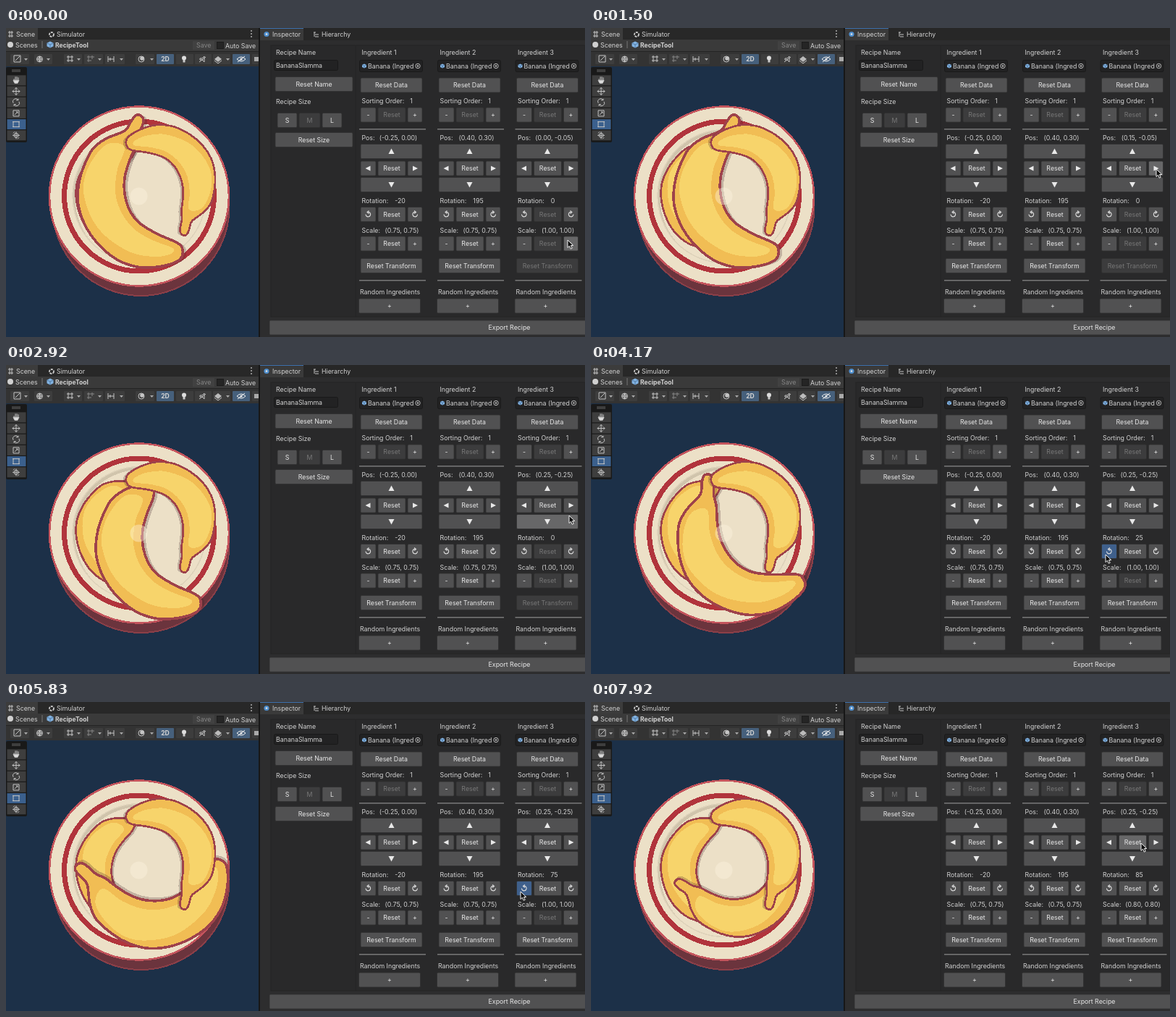
An HTML page for the animation above (8000 ms loop, 800 by 427 pixels).

```html
<!DOCTYPE html>
<html lang="en">
<head>
<meta charset="utf-8">
<title>Recipe tool</title>
<style>
  html, body { margin: 0; width: 100%; height: 100%; overflow: hidden; background: #191919; }
  svg { display: block; width: 800px; height: 427px; }
  text { font: 8.8px Inter, "Open Sans", sans-serif; fill: #d2d2d2; white-space: pre; }
  .mid { text-anchor: middle; }
  .bold { font-weight: 700; font-size: 8.6px; }
  .line { fill: none; stroke: #c4c4c4; stroke-width: 1; }
  .btn rect { fill: #515152; stroke: #303030; stroke-width: .8; }
  .btn text, .btn .solid { fill: #e8e8e8; }
  .btn .line { stroke: #e0e0e0; stroke-width: 1.1; }
  .btn.hover rect { fill: #676768; }
  .btn.press rect { fill: #3f608c; }
  .btn.off rect { fill: #3c3c3d; }
  .btn.off text { fill: #777; }
</style>
</head>
<body>
<svg id="stage" viewBox="0 0 800 427"></svg>
<script>
const stage = document.getElementById('stage');

function add(tag, attrs, parent = stage, content = '') {
  const node = document.createElementNS('http://www.w3.org/2000/svg', tag);
  for (const key in attrs) node.setAttribute(key, attrs[key]);
  node.textContent = content;
  parent.appendChild(node);
  return node;
}
const box = (x, y, w, h, fill, more, parent) => add('rect', { x, y, width: w, height: h, fill, ...more }, parent);
const label = (x, y, words, more, parent) => add('text', { x, y: y + 3.2, ...more }, parent, words);
const stroke = (d, more, parent) => add('path', { d, class: 'line', ...more }, parent);
const disc = (cx, cy, r, fill, more, parent) => add('circle', { cx, cy, r, fill, ...more }, parent);

// ---- scene -------------------------------------------------------------
box(0, 53, 349, 374, '#1c3048');
const scene = add('g', { 'shape-rendering': 'crispEdges' });

disc(186.5, 248, 122, '#6b343d', { stroke: '#8b3f48', 'stroke-width': 2 }, scene);
disc(184, 232.5, 124, '#ece0c7', { stroke: '#c4545c', 'stroke-width': 2.6 }, scene);
disc(184, 232.5, 103.5, 'none', { stroke: '#b1343c', 'stroke-width': 7 }, scene);
disc(184, 232.5, 92, '#d0c4ac', {}, scene);
disc(186.5, 235.5, 91, '#ece0c7', {}, scene);
disc(184, 232.5, 92, 'none', { stroke: '#ded2ba', 'stroke-width': 1.5 }, scene);

// Closed smooth curve through a flat list of x, y pairs.
function smooth(flat) {
  const n = flat.length / 2;
  const at = i => [flat[(i + n) % n * 2], flat[(i + n) % n * 2 + 1]];
  let d = `M${at(0)}`;
  for (let i = 0; i < n; i++) {
    const [a, b, c, e] = [at(i - 1), at(i), at(i + 1), at(i + 2)];
    const p = b.map((v, k) => v + (c[k] - a[k]) / 6);
    const q = c.map((v, k) => v - (e[k] - b[k]) / 6);
    d += `C${p} ${q} ${c}`;
  }
  return d + 'Z';
}
const skin = smooth([-5, -116, 2, -116, 6, -110, 4, -101, -3, -87, -6, -72, -14, -52, -20, -30,
  -20, -8, -13, 15, 1, 33, 26, 48, 53, 60, 60, 69, 57, 82, 41, 90, 16, 94, -8, 92, -34, 81,
  -58, 60, -75, 35, -84, 8, -84, -18, -78, -42, -64, -70, -46, -84, -20, -95, -12, -107]);
const shine = smooth([-40, -78, -58, -64, -73, -38, -77, -10, -66, 25, -46, 51, -12, 73, 22, 79,
  44, 75, 46, 67, 18, 56, -8, 40, -26, 15, -33, -12, -30, -42, -20, -72]);

function banana() {
  const g = add('g', {}, scene);
  add('path', { d: skin, fill: '#3c1e28', 'fill-opacity': .24, transform: 'translate(5 1)' }, g);
  add('path', { d: skin, fill: '#f1bd54', stroke: '#9e424b', 'stroke-width': 3.6 }, g);
  add('path', { d: shine, fill: '#f7d46b' }, g);
  return g;
}
function place(node, x, y, turn, scale) {
  node.setAttribute('transform',
    `translate(${184 + x * 100} ${232 - y * 100}) rotate(${-turn}) scale(${scale})`);
}
const first = banana(), third = banana(), second = banana();
place(first, -.25, 0, -20, .75);
place(second, .4, .3, 195, .75);
disc(183.5, 232.5, 12, '#fff6e0', { 'fill-opacity': .5 }, scene).setAttribute('shape-rendering', 'auto');
// Keep the handle faint where fruit lies below it.
scene.lastChild.setAttribute('fill-opacity', .4);

// ---- scene window bars --------------------------------------------------
box(0, 0, 349, 17, '#282828');
box(0, 0, 44, 17, '#3c3c3c');
box(0, 16, 349, 17, '#3a3a3a');
box(0, 32, 349, 21, '#333');
box(0, 32, 349, 1, '#242424');
stroke('M3 6h7M3 11h7M5 4v9M8 4v9');
label(14, 9, 'Scene');
disc(63, 9, 3, 'none', { stroke: '#ccc', 'stroke-width': 1.8, 'stroke-dasharray': '3 1.2' });
label(70, 9, 'Simulator');
[4, 8, 12].forEach(y => disc(339, y, .9, '#bbb'));
disc(6, 23, 4, '#d0d0d0');
label(13, 23.5, 'Scenes');
stroke('M50 18v10', { style: 'stroke:#777' });

function cube(x, y, r) {
  add('path', { d: `M${x} ${y - r}l${r} ${r / 2}v${r}l${-r} ${r / 2}l${-r} ${-r / 2}v${-r}z`, fill: '#83b4e3' });
  stroke(`M${x - r} ${y - r / 2}l${r} ${r / 2}l${r} ${-r / 2}M${x} ${y}v${r}`, { style: 'stroke:#3b5f87;stroke-width:.7' });
}
cube(61, 23, 4.5);
label(68, 23.5, 'RecipeTool', { class: 'bold' });
box(258, 18, 30, 12, '#414141');
label(263, 23.5, 'Save', { style: 'fill:#858585' });
box(291.5, 19.5, 9, 9, '#252525', { stroke: '#1b1b1b' });
label(303, 25, 'Auto Save');

for (const [x, w, fill] of [[6, 26], [39, 25], [80, 25], [108, 26], [137, 27], [179, 26], [208, 24, '#46607c'],
  [235, 24], [261, 23], [286, 24], [313, 24, '#46607c'], [340, 9]])
  box(x, 36, w, 14, fill || '#3d3d3d', { rx: 1 });
stroke('M11 38h9v9h-9zM13 45l6-6');
disc(46.5, 43, 4, 'none', { stroke: '#c4c4c4' });
stroke('M42.5 43h8M46.5 39v8M46.5 39q-4 4 0 8q4-4 0-8', { 'stroke-width': .7 });
stroke('M84 40h9M84 45h9M86 38v9M91 38v9');
stroke('M112 40h10M112 45h6M114 38v9M119 38v5', { style: 'stroke:#858585' });
stroke('M141 39v8M149 39v8M141 43h8M144 41v4');
disc(187, 43, 4, 'none', { stroke: '#c4c4c4' });
disc(188, 42, 2.8, '#c4c4c4');
label(220, 43, '2D', { class: 'mid bold' });
disc(246, 41.5, 3, '#ddd');
box(244.5, 44, 3, 3.5, '#ccc');
stroke('M268 42h3l3-3v8l-3-3h-3zM276 40l-9 7');
add('path', { d: 'M288 43l5-4 5 4-5 4z', fill: '#bbb' });
stroke('M288 45l5 4 5-4');
stroke('M319 43q6-6 12 0q-6 6-12 0M320 47l10-8', { style: 'stroke:#eee' });
disc(325, 43, 1.6, '#eee');
box(343, 40, 6, 6, '#aaa');
for (const x of [25, 56, 98, 127, 157, 199, 304])
  add('path', { d: `M${x} 42h5l-2.5 3z`, fill: '#aaa' });

box(0, 54, 29, 104, '#191919', { rx: 2 });
stroke('M8 58h12M8 60h12', { style: 'stroke:#777;stroke-width:.8' });
const tools = [
  'M-3 0v-2M-1 0v-5M1 0v-5M3 0v-4M-4 0l2 4h4l2-4z',
  'M-5 0h10M0-5v10M-5 0l2-2M-5 0l2 2M5 0l-2-2M5 0l-2 2M0-5l-2 2M0-5l2 2M0 5l-2-2M0 5l2-2',
  'M-4 1a4 4 0 0 1 7-4v-2M4-1a4 4 0 0 1-7 4v2M3-3h-3M-3 3h3',
  'M-4-4h8v8h-8zM-2 2l4-4M0-2h2v2',
  'M-4-3.500h8v7h-8zM-5-3.500h2M3-3.500h2M-5 3.500h2M3 3.500h2',
  'M-5 0h10M0-5v10M-3 0a3 3 0 1 0 6 0a3 3 0 1 0-6 0M-4-3l2-2M4 3l-2 2'
];
tools.forEach((d, i) => {
  const y = 72.3 + i * 15.2;
  box(1.5, y - 7, 26, 14, i === 4 ? '#3b608d' : '#3e3e3e');
  stroke(d, { transform: `translate(14 ${y})`, style: i ? '' : 'fill:#ddd' });
});

// ---- inspector -----------------------------------------------------------
box(349, 0, 2, 427, '#171717');
box(351, 0, 449, 427, '#2d2d2e');
box(351, 0, 449, 17, '#272727');
box(351, 0, 60, 17, '#3a3a3a');
box(351, 0, 60, 1, '#3b70ad');
disc(360, 8.5, 3.6, '#4f8fce');
disc(360, 8.5, 1.3, '#e6e6e6');
label(368, 9, 'Inspector');
stroke('M425 6h3M427 9h5M427 12h5M426 6v6');
label(436, 9, 'Hierarchy');
box(366, 24, 434, 375, '#29292a', { stroke: '#242425' });
box(482.5, 24, 1, 375, '#242425');

const hot = [];
function button(x, y, w, h, words, off) {
  const g = add('g', { class: off ? 'btn off' : 'btn' });
  box(x, y, w, h, '', { rx: 1.5 }, g);
  const cx = x + w / 2, cy = y + h / 2;
  const move = { transform: `translate(${cx} ${cy})` };
  const arrows = { up: 'M0-4L4 3.500h-8z', down: 'M0 4L4-3.500h-8z', left: 'M-4 0L3-3.500v7z', right: 'M4 0L-3-3.500v7z' };
  if (arrows[words]) add('path', { d: arrows[words], class: 'solid', ...move }, g);
  else if (words === 'ccw') stroke('M-1.500-3a3.300 3.300 0 1 1-2 3M1-5l-2.500 2 2.500 2', move, g);
  else if (words === 'cw') stroke('M1.500-3a3.300 3.300 0 1 0 2 3M-1-5l2.500 2-2.500 2', move, g);
  else label(cx, cy, words, { class: 'mid' }, g);
  const item = { g, x, y, w, h, off };
  hot.push(item);
  return item;
}

label(373, 34, 'Recipe Name');
box(370.5, 44.5, 88, 14, '#222223', { rx: 2, stroke: '#191919' });
label(373, 51.5, 'BananaSlamma');
button(372, 67.5, 107, 20, 'Reset Name');
label(373, 102, 'Recipe Size');
button(375, 117.5, 27, 20, 'S');
button(405, 117.5, 29, 20, 'M', true);
button(437, 117.5, 27, 20, 'L');
button(372, 144.5, 107, 20, 'Reset Size');

function trio(x, y, left, right, off) {
  return [button(x, y, 21, 20, left), button(x + 24, y, 38, 20, 'Reset', off), button(x + 65, y, 20, 20, right)];
}
function column(n, x, pos, turn, scale) {
  const fresh = n === 3;
  label(x + 1.5, 34, `Ingredient ${n}`);
  box(x - 1.5, 44.5, 87, 16, '#222223', { rx: 2, stroke: '#1a1a1a' });
  cube(x + 5, 52.5, 3);
  label(x + 10, 52.5, 'Banana (Ingred');
  disc(x + 79, 52.5, 3.2, 'none', { stroke: '#bbb' });
  disc(x + 79, 52.5, 1.2, '#bbb');
  button(x, 69, 85, 20, 'Reset Data');
  label(x + 1.5, 101, 'Sorting Order:');
  label(x + 70, 101, '1', { class: 'mid' });
  trio(x, 110, '-', '+', true);
  box(x - 2, 139, 92, 1.6, '#747474');
  label(x + 1.5, 152, 'Pos:');
  const posText = label(x + 52, 152, pos, { class: 'mid' });
  button(x, 160.5, 85, 20, 'up');
  const [, , right] = trio(x, 184, 'left', 'right');
  const down = button(x, 206.5, 85, 20, 'down');
  label(x + 1.5, 239, 'Rotation:');
  const turnText = label(fresh ? x + 50 : x + 54.5, 239, turn, { class: 'mid' });
  const [ccw, turnReset] = trio(x, 247.5, 'ccw', 'cw', fresh);
  label(x + 1.5, 279.5, 'Scale:');
  const scaleText = label(x + 57, 279.5, scale, { class: 'mid' });
  const [minus, scaleReset] = trio(x, 288, '-', '+', fresh);
  const allReset = button(x, 318.5, 85, 20, 'Reset Transform', fresh);
  box(x - 2, 348, 92, 1.6, '#747474');
  label(x - 1, 364.5, 'Random Ingredients');
  button(x - 2.5, 374, 85, 20, '+');
  return { posText, turnText, scaleText, right, down, ccw, turnReset, minus, scaleReset, allReset };
}
column(1, 490, '(-0.25, 0.00)', '-20', '(0.75, 0.75)');
column(2, 598, '(0.40, 0.30)', '195', '(0.75, 0.75)');
const ui = column(3, 705.5, '(0.00, -0.05)', '0', '(1.00, 1.00)');

button(364, 404, 663, 20, 'Export Recipe');

const cursor = add('path', {
  d: 'M0 0v10.500l2.500-2.300 1.700 4 2-.9-1.700-3.800h3.300z',
  fill: '#0b0b0b', stroke: '#f2f2f2', 'stroke-width': 1
});

// ---- motion ----------------------------------------------------------------
const LOOP = 8000, TICK = 1000 / 12, CLICK = 2 * TICK;
const path = [[0, 776, 293], [250, 776, 290], [800, 781, 195], [1760, 781, 195], [2050, 779, 209],
  [3000, 778, 208], [3380, 711, 262], [6250, 711, 262], [6550, 711, 300], [7350, 711, 300], [7830, 760, 195], [LOOP, 760, 195]];
const series = [
  { item: ui.right, from: 1080, count: 5 },
  { item: ui.down, from: 2330, count: 4 },
  { item: ui.ccw, from: 3480, count: 17 },
  { item: ui.minus, from: 6750, count: 4 }
];

function pointer(t) {
  const i = path.findIndex((p, k) => k && t <= p[0]);
  const [a, b] = [path[i - 1], path[i]];
  const u = (t - a[0]) / (b[0] - a[0]);
  const e = u * u * (3 - 2 * u);
  return [a[1] + (b[1] - a[1]) * e, a[2] + (b[2] - a[2]) * e];
}
const clicks = (s, t) => Math.max(0, Math.min(s.count, Math.floor((t - s.from) / CLICK) + 1));
const isPressed = (s, t) => {
  const n = clicks(s, t);
  return n > 0 && t - s.from - (n - 1) * CLICK < TICK;
};
const pair = (a, b) => `(${a.toFixed(2)}, ${b.toFixed(2)})`;

function draw(now) {
  const t = Math.floor((now % LOOP + 4) / TICK) * TICK % LOOP;
  const [nx, ny, nt, ns] = series.map(s => clicks(s, t));
  const x = nx * .05, y = -.05 - ny * .05, turn = nt * 5, scale = 1 - ns * .05;
  place(third, x, y, turn, scale);
  ui.posText.textContent = pair(x, y);
  ui.turnText.textContent = turn;
  ui.turnText.setAttribute('x', turn ? 757.5 : 755.5);
  ui.scaleText.textContent = pair(scale, scale);
  ui.turnReset.off = ui.allReset.off = !nt;
  ui.scaleReset.off = !ns;

  const [px, py] = pointer(t);
  cursor.setAttribute('transform', `translate(${px} ${py})`);
  const active = series.find(s => isPressed(s, t));
  for (const b of hot) {
    const over = px >= b.x && px <= b.x + b.w && py >= b.y && py <= b.y + b.h;
    const state = b.off ? ' off' : active && active.item === b ? ' press' : over ? ' hover' : '';
    b.g.setAttribute('class', 'btn' + state);
  }
}
const start = performance.now();
function loop() {
  draw(performance.now() - start);
  requestAnimationFrame(loop);
}
loop();
</script>
</body>
</html>
```
